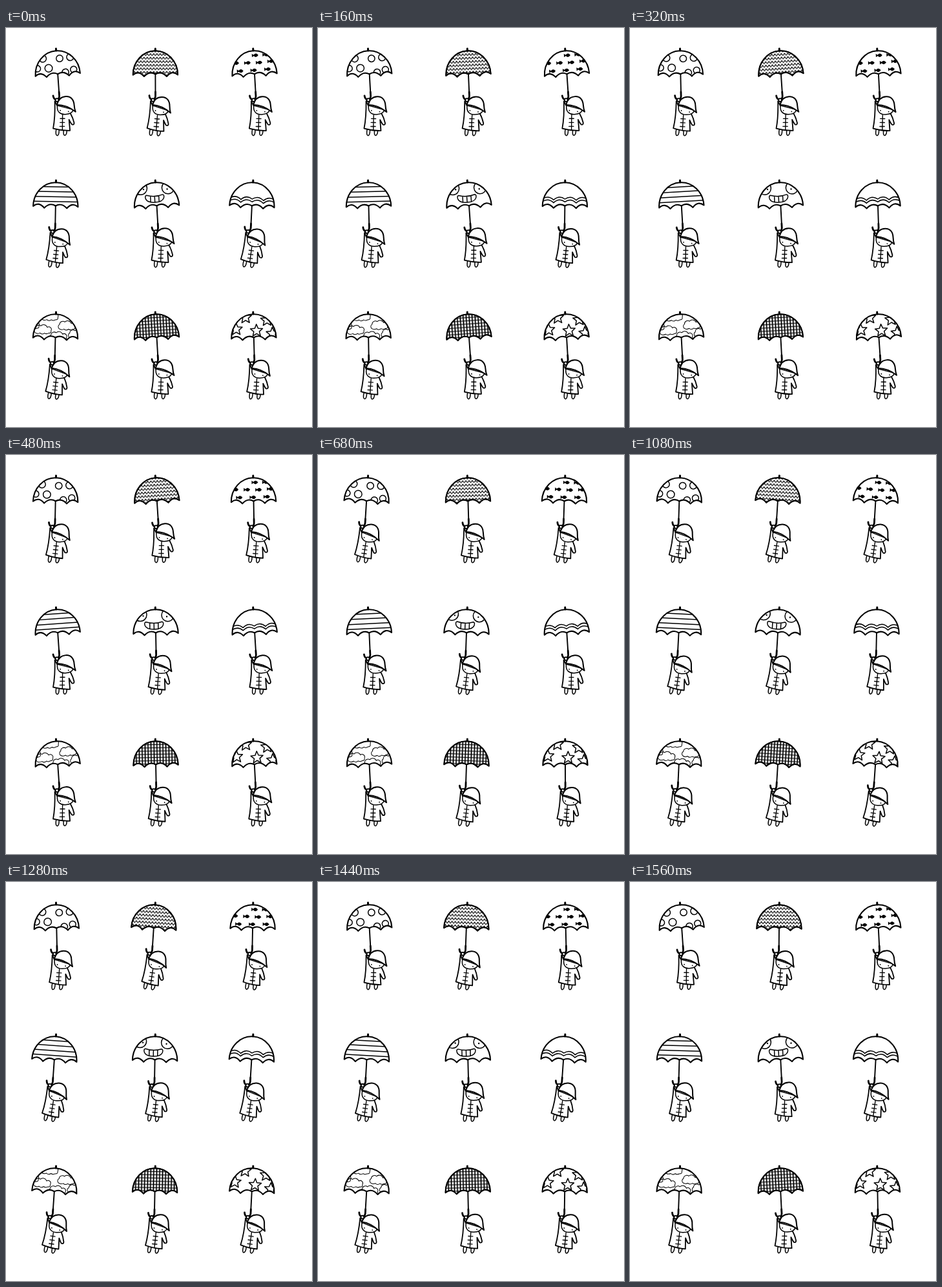
Animation of 474x618 px, one loop 1.6 s. Source, as an HTML page:

```html
<!DOCTYPE html>
<html lang="en">
<head>
<meta charset="utf-8">
<title>Swinging umbrellas</title>
<style>
  @property --t { syntax: "<angle>"; inherits: true; initial-value: 0deg; }
  html, body { margin: 0; width: 100%; height: 100%; overflow: hidden; background: #fff; }
  svg {
    display: block; width: 474px; height: 618px;
    fill: none; stroke: #000; stroke-width: 1.5;
    stroke-linecap: round; stroke-linejoin: round;
    animation: clock 1600ms steps(40, end) infinite;
  }
  @keyframes clock { from { --t: 0deg; } to { --t: 360deg; } }

  /* each pendulum hangs from its tip, --p is its phase */
  .swing { transform: rotate(calc(-4deg * cos(var(--t) - var(--p)))); }
  .thin { stroke-width: 1; }
  .dot { fill: #000; stroke: none; }
  .white { fill: #fff; }
</style>
</head>
<body>
<svg viewBox="0 0 474 618">
  <defs>
    <path id="canopy" d="M-34.7 39.5A34.7 37.2 0 0 1 34.7 39.5Q26 32 17.5 42Q9 33 0 38.5Q-9 33 -17.5 42Q-26 32 -34.7 39.5Z"/>
    <clipPath id="dome"><use href="#canopy"/></clipPath>

    <g id="kid">
      <use href="#canopy" stroke-width="2.1"/>
      <path d="M0 -1V2" stroke-width="3"/>
      <path d="M0 38V70" stroke-width="1.9"/>

      <!-- legs and coat -->
      <g class="white">
        <path d="M-8.5 124Q-10.5 133 -7.5 133.5Q-4.5 133 -4 125"/>
        <path d="M3 126Q1.5 134 4.5 134Q7.5 133 8 126"/>
        <path d="M-7.5 80Q-8.5 105 -13 122Q0 126.5 12.8 127L12.5 110Q15 116 16.5 117.8Q20 119 20 115.5Q18.5 107 15.5 101L-4 88Z" stroke-width="1.8"/>
      </g>
      <path d="M3 102L1 126M-1 107.5L6 108M-1.7 113.5L5.3 114M-2.4 119.5L4.8 120" stroke-width="1.4"/>

      <!-- head and hat -->
      <path class="white" d="M-4 87C-6 97 0 101.5 7.5 101.5C14 101.5 19 99 20 95Z"/>
      <circle class="dot" cx="0" cy="95" r=".9"/>
      <circle class="dot" cx="12.5" cy="97.5" r=".9"/>
      <path class="white" d="M-4.6 86C-2 77 4 74 10 74C18 74 22 80 22 88Q22 94 23.4 98.6Q10 87 -4.6 86Z" stroke-width="2"/>

      <!-- handle and hand -->
      <path d="M0 66V73Q-1 78.5 -5 78Q-9 77 -9.5 71.5" stroke-width="2.8"/>
      <circle class="white" cx="-4" cy="78.5" r="2.4" stroke-width="1.8"/>
    </g>

    <pattern id="zigzag" width="5" height="5.5" patternUnits="userSpaceOnUse">
      <path class="thin" d="M-1 5.3L0 4.5L2.5 1L5 4.5L6 3.1"/>
    </pattern>
    <pattern id="plaid" width="4.6" height="5" patternUnits="userSpaceOnUse">
      <path d="M2.3 -1V6" stroke-width="1.9"/>
      <path d="M-1 2.5H6" stroke-width="1.2"/>
    </pattern>

    <path id="fish" class="dot" d="M-5 -2.7L-2.2 -.8Q1.5 -5 5 0Q1.5 5 -2.2 .8L-5 2.7Z"/>
    <path id="cloud" class="thin" d="M-12 5a4 4 0 0 1 0 -7a5 5 0 0 1 8 -4a6 6 0 0 1 10 2a4 4 0 0 1 6 5q1 4 -4 4q-3 2 -6 0q-4 3 -7 0q-4 2 -7 0z"/>
    <path id="star" d="M0 -10L2.6 -3.6L9.5 -3.1L4.3 1.4L5.9 8.1L0 4.5L-5.9 8.1L-4.3 1.4L-9.5 -3.1L-2.6 -3.6Z"/>
    <path id="wave" d="M-36 31Q-26 24 -17.5 32Q-9 24 0 30.5Q9 24 17.5 32Q26 24 36 31"/>
  </defs>

  <!-- circles -->
  <g transform="translate(77.5 33)"><g class="swing" style="--p:0deg">
    <g clip-path="url(#dome)">
      <circle cx="-13.5" cy="28.5" r="5.8"/>
      <circle cx="4.5" cy="14.5" r="5.2"/>
      <circle cx="-21.5" cy="13" r="5.5"/>
      <circle cx="21" cy="13.5" r="5.5"/>
      <circle cx="12" cy="36.5" r="5.2"/>
      <circle cx="25" cy="33" r="5"/>
      <circle cx="-31" cy="28" r="5"/>
    </g>
    <use href="#kid"/>
  </g></g>

  <!-- zigzags -->
  <g transform="translate(231.3 33)"><g class="swing" style="--p:88deg">
    <use href="#canopy" fill="url(#zigzag)"/>
    <use href="#kid"/>
  </g></g>

  <!-- fish -->
  <g transform="translate(382.8 33)"><g class="swing" style="--p:34deg">
    <g clip-path="url(#dome)">
      <use href="#fish" x="2.5" y="9.5"/>
      <use href="#fish" x="19" y="9.5"/>
      <use href="#fish" x="-28" y="20"/>
      <use href="#fish" x="-10" y="20.5"/>
      <use href="#fish" x="8" y="21"/>
      <use href="#fish" x="26" y="20"/>
      <use href="#fish" x="-22" y="32.5"/>
      <use href="#fish" x="-1" y="32.5"/>
      <use href="#fish" x="20.5" y="32"/>
    </g>
    <use href="#kid"/>
  </g></g>

  <!-- stripes -->
  <g transform="translate(77.5 237)"><g class="swing" style="--p:105deg">
    <path clip-path="url(#dome)" d="M-36 9H36M-36 16.5H36M-36 24.3H36M-36 31.8H36"/>
    <use href="#kid"/>
  </g></g>

  <!-- grin -->
  <g transform="translate(231.3 237)"><g class="swing" style="--p:33deg">
    <g clip-path="url(#dome)">
      <circle cx="-23.5" cy="10" r="10"/>
      <circle cx="19" cy="11.5" r="9.5"/>
      <circle class="dot" cx="-19" cy="12" r="1.2"/>
      <circle class="dot" cx="17.5" cy="13.5" r="1.2"/>
      <path d="M-15 21.5Q-2 25.5 10 21.5Q13 22 11.5 27Q9 33 -2.5 33Q-14 33 -16.5 27Q-18 22 -15 21.5ZM-9 23.5V32M-2.5 24V33M4 23.5V32.5"/>
    </g>
    <use href="#kid"/>
  </g></g>

  <!-- waves -->
  <g transform="translate(382.8 237)"><g class="swing" style="--p:135deg">
    <g clip-path="url(#dome)">
      <use href="#wave" y="-2.5"/>
      <use href="#wave" y="1.8"/>
    </g>
    <use href="#kid"/>
  </g></g>

  <!-- clouds -->
  <g transform="translate(77.5 441)"><g class="swing" style="--p:112deg">
    <g clip-path="url(#dome)">
      <use href="#cloud" x="-19" y="27"/>
      <use href="#cloud" x="18" y="20"/>
      <use href="#cloud" x="-9" y="6"/>
      <use href="#cloud" x="5" y="37"/>
      <use href="#cloud" x="34" y="33"/>
      <use href="#cloud" x="-38" y="20"/>
    </g>
    <use href="#kid"/>
  </g></g>

  <!-- plaid -->
  <g transform="translate(231.3 441)"><g class="swing" style="--p:34deg">
    <use href="#canopy" fill="url(#plaid)"/>
    <use href="#kid"/>
  </g></g>

  <!-- stars -->
  <g transform="translate(382.8 441)"><g class="swing" style="--p:67deg">
    <g clip-path="url(#dome)">
      <use href="#star" x="4.5" y="28"/>
      <use href="#star" x="21" y="12"/>
      <use href="#star" x="-12" y="7"/>
      <use href="#star" x="-27" y="25"/>
      <use href="#star" x="29" y="33"/>
    </g>
    <use href="#kid"/>
  </g></g>
</svg>
</body>
</html>
```
